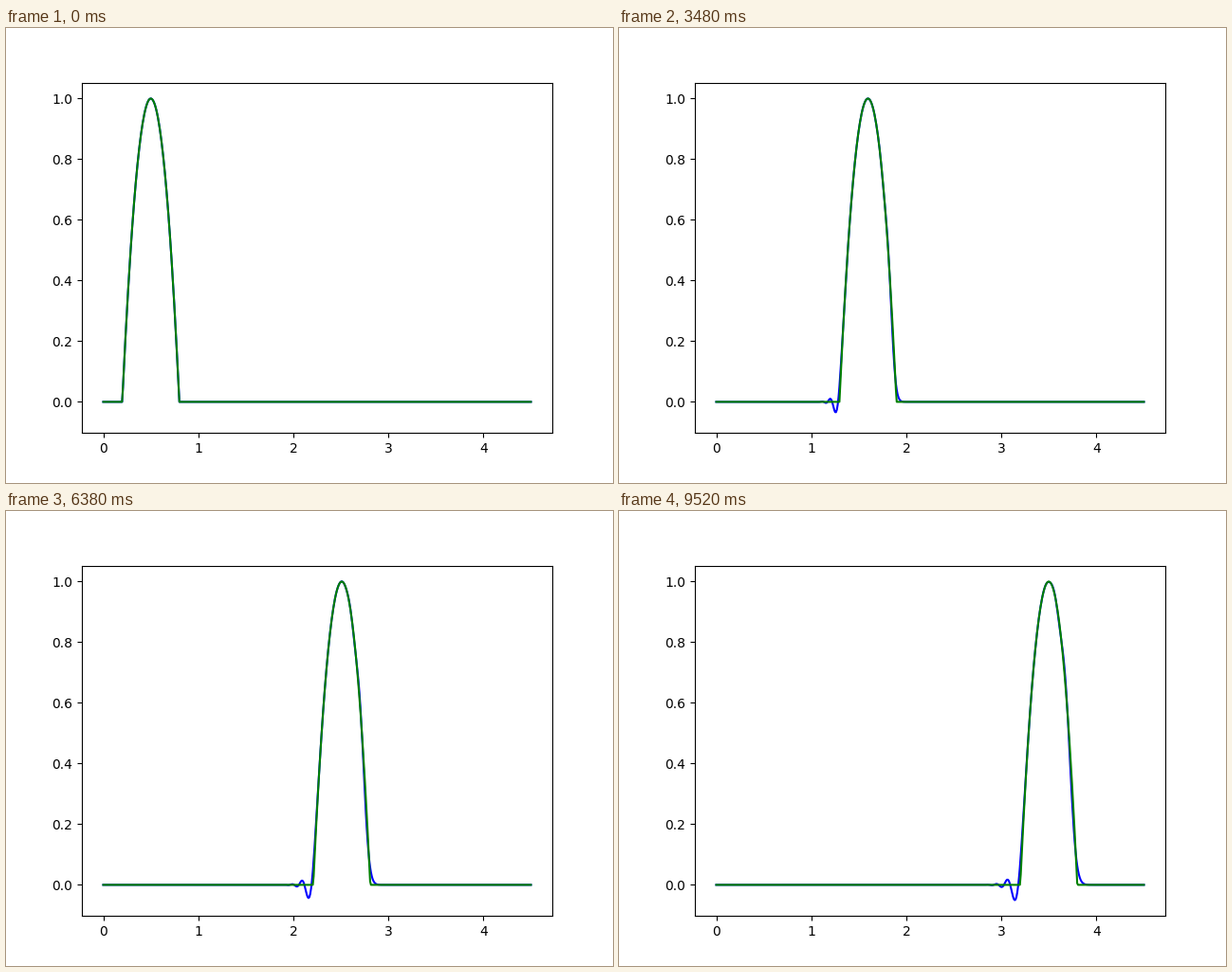
A matplotlib script for the animation above (9540 ms loop, 640x480 px).

```python
import numpy as np
import matplotlib.pyplot as plt
from matplotlib.animation import FuncAnimation

LENGTH, CELLS = 4.5, 500
CFL = 0.7
FRAMES, INTERVAL = 477, 20

x = np.linspace(0, LENGTH, CELLS + 1)
dt = CFL * (x[1] - x[0])


def bump(s):
    """Parabolic pulse of height 1 on 0.2 < s < 0.8."""
    return np.maximum(0, 1 - ((s - 0.5) / 0.3) ** 2)


def lax_wendroff(u):
    left, right = np.roll(u, 1), np.roll(u, -1)
    return (u - CFL / 2 * (right - left)
            + CFL ** 2 / 2 * (right - 2 * u + left))


waves = [bump(x)]
for _ in range(FRAMES - 1):
    waves.append(lax_wendroff(waves[-1]))

fig, ax = plt.subplots(figsize=(6.4, 4.8), dpi=100)
ax.set_xlim(-0.05 * LENGTH, 1.05 * LENGTH)
ax.set_ylim(-0.1025, 1.0525)
numeric, = ax.plot(x, waves[0], color="b", lw=1.5)
exact, = ax.plot(x, waves[0], color="g", lw=1.5)


def update(i):
    numeric.set_ydata(waves[i])
    exact.set_ydata(bump(x - i * dt))
    return numeric, exact


anim = FuncAnimation(fig, update, frames=FRAMES, interval=INTERVAL,
                     repeat=True, repeat_delay=0, blit=False)
plt.show()
```
